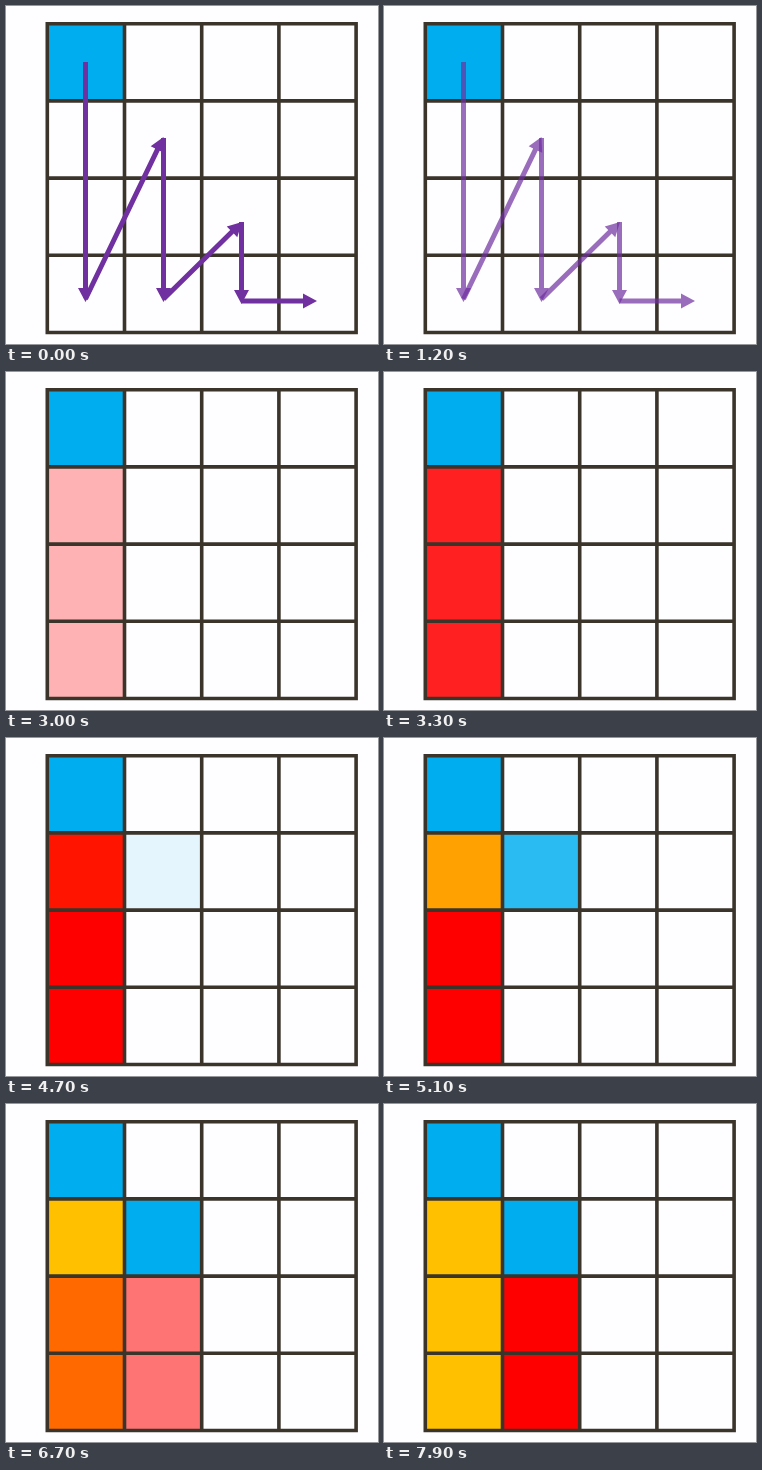
Write an HTML page with a canvas that moves like this. It is 372 px wide and 338 px high and loops after 8 s.

```html
<!DOCTYPE html>
<html lang="en">
<head>
<meta charset="utf-8">
<style>
  html, body { margin: 0; width: 100%; height: 100%; overflow: hidden; background: #fefdff; }
  canvas { display: block; }
</style>
</head>
<body>
<canvas id="stage" width="372" height="338"></canvas>
<script>
const ctx = document.getElementById('stage').getContext('2d');
const LOOP = 8000, STEP = 100, FADE = 750;
const LEFT = 41.3, TOP = 17.7, CELL = 77.2, SIZE = 4 * CELL;
const BLUE = '#00aeef', RED = '#ff0000', YELLOW = '#ffc000';

// [column, row, row count, colour, fade start]
const fills = [
  [0, 0, 1, BLUE, -FADE],
  [0, 1, 3, RED, 2725],
  [0, 1, 1, YELLOW, 4546],
  [1, 1, 1, BLUE, 4546],
  [0, 2, 2, YELLOW, 6304],
  [1, 2, 2, RED, 6304],
];

// [tail x, tail y, tip x, tip y]
const arrows = [
  [79.5, 56, 79.5, 296],
  [79.5, 293, 157.5, 131],
  [157.5, 132, 157.5, 296],
  [157.5, 293, 236, 216],
  [235.5, 216, 235.5, 298],
  [235.5, 295, 311, 295],
];

function fade(t, start) {
  const p = Math.min(1, Math.max(0, (t - start) / FADE));
  return (1 - Math.cos(Math.PI * p)) / 2;
}

function drawArrow([x1, y1, x2, y2]) {
  const length = Math.hypot(x2 - x1, y2 - y1), neck = length - 14;
  ctx.save();
  ctx.translate(x1, y1);
  ctx.rotate(Math.atan2(y2 - y1, x2 - x1));
  ctx.beginPath();
  ctx.moveTo(0, -2.5);
  ctx.lineTo(neck, -2.5);
  ctx.lineTo(neck, -7.5);
  ctx.lineTo(length, 0);
  ctx.lineTo(neck, 7.5);
  ctx.lineTo(neck, 2.5);
  ctx.lineTo(0, 2.5);
  ctx.fill();
  ctx.restore();
}

function drawGrid() {
  ctx.strokeStyle = '#3b342b';
  ctx.lineWidth = 3.6;
  ctx.lineCap = 'square';
  ctx.beginPath();
  for (let i = 0; i <= 4; i++) {
    const x = LEFT + i * CELL, y = TOP + i * CELL;
    ctx.moveTo(x, TOP);
    ctx.lineTo(x, TOP + SIZE);
    ctx.moveTo(LEFT, y);
    ctx.lineTo(LEFT + SIZE, y);
  }
  ctx.stroke();
}

function draw(t) {
  ctx.globalAlpha = 1;
  ctx.fillStyle = '#fefdff';
  ctx.fillRect(0, 0, 372, 338);
  for (const [col, row, rows, color, start] of fills) {
    ctx.globalAlpha = fade(t, start);
    ctx.fillStyle = color;
    ctx.fillRect(LEFT + col * CELL, TOP + row * CELL, CELL, rows * CELL);
  }
  ctx.globalAlpha = 1;
  drawGrid();
  ctx.globalAlpha = 1 - fade(t, 925);
  ctx.fillStyle = '#7030a0';
  arrows.forEach(drawArrow);
}

function tick() {
  const t = performance.now() % LOOP;
  draw(Math.floor(t / STEP) * STEP);
  requestAnimationFrame(tick);
}
tick();
</script>
</body>
</html>
```
